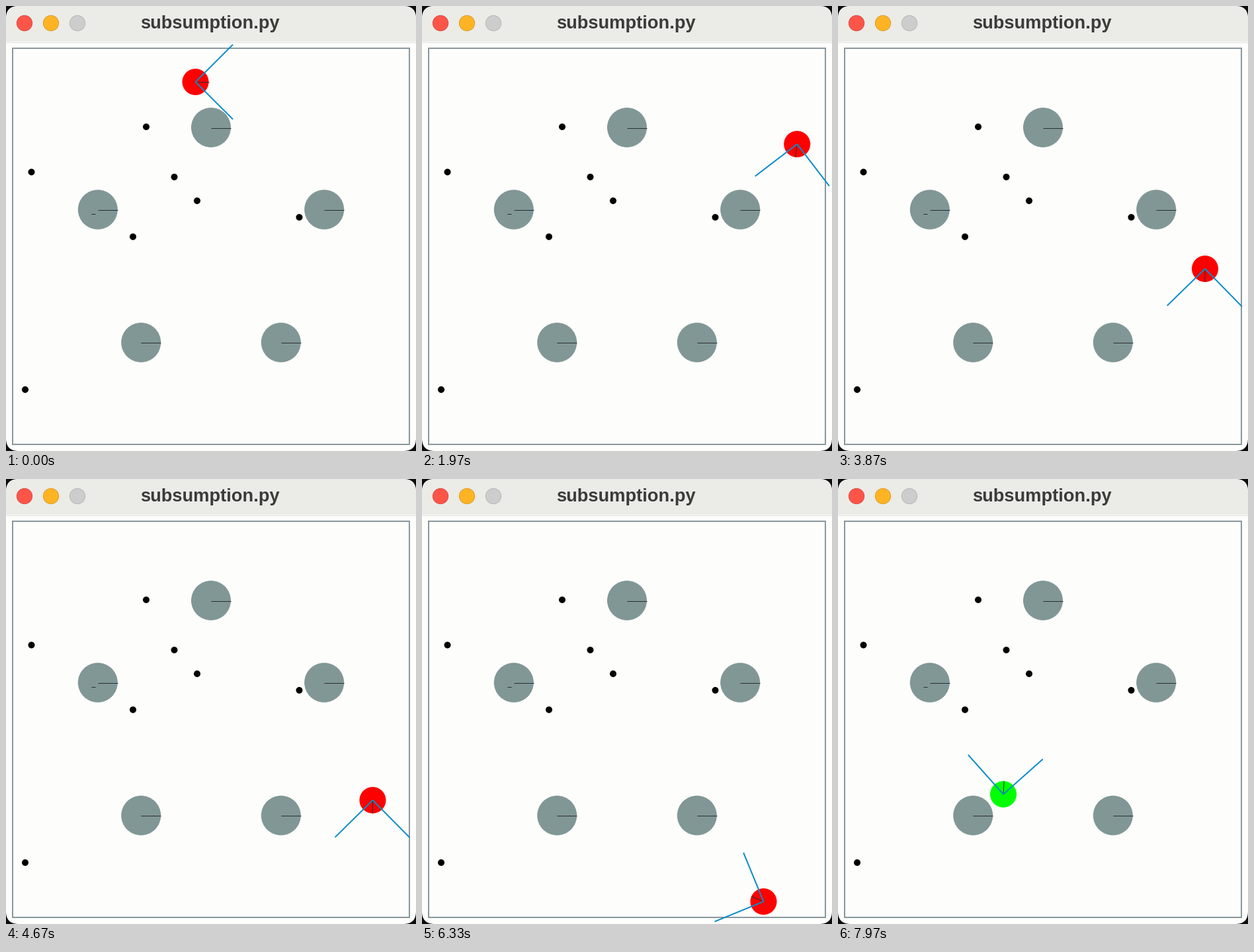
A matplotlib script that plays this animation: 620x674 px, repeating every 8000 ms.

```python
import numpy as np
import matplotlib.pyplot as plt
from matplotlib.animation import FuncAnimation
from matplotlib.patches import Circle, FancyBboxPatch, Rectangle

W, H, DPI = 620, 674, 100
FRAMES, LOOP = 240, 8000
PX = 72 / DPI

LEFT, RIGHT, TOP, BOTTOM = 10, 610, 64, 664
BODY, WHISKER, POST, DOT = 20, 80, 30, 5
INK, STEEL, TEAL = "#26302f", "#819796", "#0a8cc6"


def direction(deg):
    """Unit vector, clockwise from the right."""
    a = np.radians(deg)
    return np.array([np.cos(a), np.sin(a)])


# five posts on a ring, the first at the top
POSTS = [np.array([310, 364]) + 180 * direction(72 * i - 90) for i in range(5)]
DOTS = [(212, 183), (38.5, 251.5), (254.5, 259), (289, 295),
        (443.5, 320), (192, 349.5), (29, 581)]

# key poses: step, x, y, heading
POSES = [
    (0, 286.5, 115, 0),
    (32, 464, 136, 11),
    (44, 541, 152, 13),
    (55, 569, 196, 98),
    (116, 555, 398, 90.7),
    (162, 554.5, 567.5, 90),
    (176, 554.5, 613, 91),
    (189, 516.5, 640, 202.7),
    (229, 290, 516, 214),
    (239, 250, 477.5, 273.3),
]


def pose(step):
    """Position and heading, on arcs that leave each pose along its heading."""
    i = max(k for k, key in enumerate(POSES[:-1]) if key[0] <= step)
    (s0, *p0, h0), (s1, *p1, h1) = POSES[i], POSES[i + 1]
    p0, p1 = np.array(p0), np.array(p1)
    u = (step - s0) / (s1 - s0)
    pull = np.hypot(*(p1 - p0)) / np.cos(np.radians(h1 - h0) / 4) ** 2
    pos = (p0 + (p1 - p0) * u * u * (3 - 2 * u)
           + pull * u * (1 - u) ** 2 * direction(h0)
           - pull * u * u * (1 - u) * direction(h1))
    return pos, h0 + (h1 - h0) * u


def touches(start, tip):
    """True if a whisker reaches through a wall or into a post."""
    if not (LEFT < tip[0] < RIGHT and TOP < tip[1] < BOTTOM):
        return True
    ray = tip - start
    for post in POSTS:
        u = np.clip(np.dot(post - start, ray) / np.dot(ray, ray), 0, 1)
        if np.hypot(*(start + u * ray - post)) < POST:
            return True
    return False


fig = plt.figure(figsize=(W / DPI, H / DPI), dpi=DPI, facecolor="#0c0c0c")
ax = fig.add_axes([0, 0, 1, 1])
ax.set_xlim(0, W)
ax.set_ylim(H, 0)
ax.axis("off")


def line(xs, ys, color=INK, width=1, z=3):
    return ax.plot(xs, ys, color=color, lw=width * PX, zorder=z,
                   solid_capstyle="butt")[0]


def disc(center, radius, color, edge="none", z=2):
    return ax.add_patch(Circle(center, radius, fc=color, ec=edge,
                               lw=PX, zorder=z))


# window
window = ax.add_patch(FancyBboxPatch(
    (0, 0), W, H, boxstyle="round,pad=0,rounding_size=19",
    fc="#fdfdfc", ec="none", zorder=0))
bar = ax.add_patch(Rectangle((0, 0), W, 54, fc="#ebebe7", ec="none", zorder=1))
bar.set_clip_path(window)
line([0, W], [54.5, 54.5], "#dededc", z=1)
buttons = [("#ff5549", "#e0463c"), ("#fdb424", "#dd9c20"),
           ("#cdcdcc", "#b8b8b8")]
for i, (fill, edge) in enumerate(buttons):
    disc((28 + 40 * i, 26), 11.6, fill, edge)
ax.text(308.5, 34, "subsumption.py", family="Liberation Sans", weight="bold",
        size=27.2 * PX, color="#3b3b39", ha="center", va="baseline")

# arena
ax.add_patch(Rectangle((LEFT, TOP), RIGHT - LEFT, BOTTOM - TOP, fill=False,
                       ec="#8a979d", lw=2 * PX, zorder=1))
for x, y in POSTS:
    disc((x, y), POST, STEEL)
    mid = np.floor(y) + 0.5
    line([x, x + POST], [mid, mid])
line([129, 135], [314.5, 314.5])
for dot in DOTS:
    disc(dot, DOT, "black")

# robot
body = disc((0, 0), BODY, "red", z=5)
nose = line([], [], z=6)
whiskers = [line([], [], TEAL, 2, z=7) for _ in range(2)]


def draw(step):
    pos, heading = pose(step)
    body.center = tuple(pos)
    nose.set_data(*np.transpose([pos, pos + BODY * direction(heading)]))
    hit = False
    for whisker, turn in zip(whiskers, (-45, 45)):
        tip = pos + WHISKER * direction(heading + turn)
        whisker.set_data(*np.transpose([pos, tip]))
        hit = hit or touches(pos, tip)
    body.set_facecolor("red" if hit else "lime")
    return [body, nose, *whiskers]


anim = FuncAnimation(fig, draw, frames=FRAMES, interval=LOOP / FRAMES,
                     init_func=lambda: draw(0), repeat=True, repeat_delay=0)
plt.show()
```
